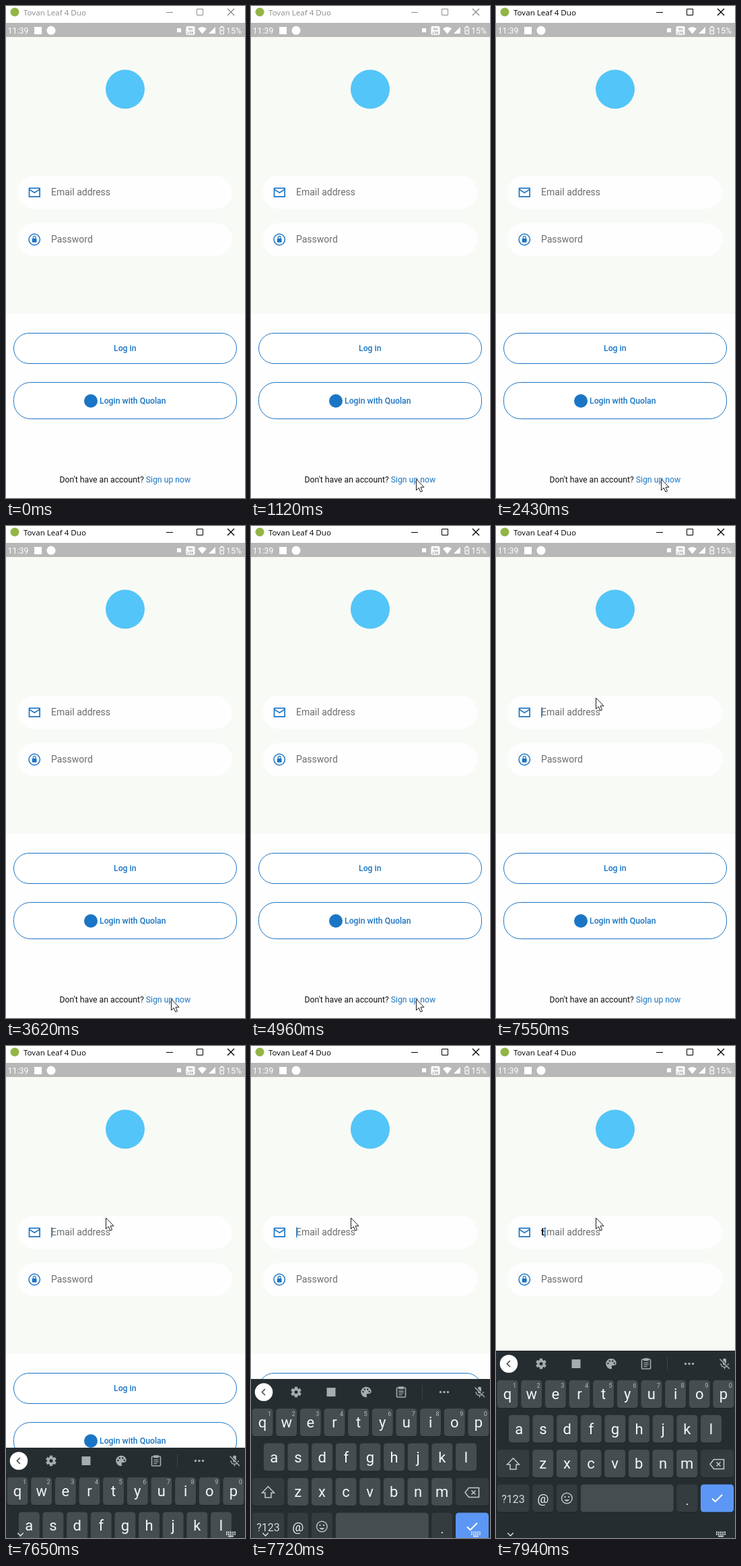
An HTML page with a canvas that plays this animation: 355x730 px, repeating every 8 s.

```html
<!DOCTYPE html>
<html lang="en">
<head>
<meta charset="utf-8">
<title>Login screen</title>
<style>
html, body { margin: 0; width: 100%; height: 100%; overflow: hidden; background: #fff; }
canvas { display: block; width: 355px; height: 730px; }
</style>
</head>
<body>
<canvas id="stage"></canvas>
<script>
const W = 355, H = 730, LOOP = 8000;
const BLUE = '#1a75c4', KEY = '#454d50', DARK_KEY = '#343c40', PANEL = '#252d30', ICON = '#a6adb1';
const canvas = document.getElementById('stage');
const ctx = canvas.getContext('2d');
const dpr = window.devicePixelRatio || 1;
canvas.width = W * dpr;
canvas.height = H * dpr;

const clamp = v => Math.max(0, Math.min(1, v));
const phase = (t, from, to) => clamp((t - from) / (to - from));
const easeOut = p => 1 - (1 - p) ** 3;
const easeInOut = p => p * p * (3 - 2 * p);
const mix = (a, b, p) => a + (b - a) * p;

function text(str, x, y, size, color, { weight = 400, align = 'left', family = 'Roboto' } = {}) {
  ctx.font = `${weight} ${size}px ${family}, sans-serif`;
  ctx.textAlign = align;
  ctx.fillStyle = color;
  ctx.fillText(str, x, y);
}

function rect(x, y, w, h, color) {
  ctx.fillStyle = color;
  ctx.fillRect(x, y, w, h);
}

function rounded(x, y, w, h, r, fill, stroke, line = 1) {
  ctx.beginPath();
  ctx.roundRect(x, y, w, h, r);
  if (fill) { ctx.fillStyle = fill; ctx.fill(); }
  if (stroke) { ctx.strokeStyle = stroke; ctx.lineWidth = line; ctx.stroke(); }
}

function circle(x, y, r, fill, stroke, line = 1) {
  ctx.beginPath();
  ctx.arc(x, y, r, 0, 7);
  if (fill) { ctx.fillStyle = fill; ctx.fill(); }
  if (stroke) { ctx.strokeStyle = stroke; ctx.lineWidth = line; ctx.stroke(); }
}

// Draws a path given relative to the point x, y.
function shape(d, x, y, fill, stroke, line = 1.5) {
  ctx.save();
  ctx.translate(x, y);
  const path = new Path2D(d);
  if (fill) { ctx.fillStyle = fill; ctx.fill(path); }
  if (stroke) { ctx.strokeStyle = stroke; ctx.lineWidth = line; ctx.stroke(path); }
  ctx.restore();
}

function titleBar(active) {
  const ink = active ? '#000' : '#8c8c8c';
  rect(0, 0, W, 25, '#fff');
  circle(13, 9, 6.5, '#93b545');
  text('Tovan Leaf 4 Duo', 26, 14, 11.6, ink, { family: 'Open Sans' });
  shape('M238 9.5h10M283.5 4.5h9v9h-9z', 0, 0, null, ink, 1);
  shape('M-5 -5L5 5M5 -5L-5 5', 334, 9, null, ink, 1.4);
}

function statusBar() {
  rect(0, 25, W, 21, '#b8b8b8');
  text('11:39', 2.5, 41, 12.4, '#fff');
  rect(42, 31, 11, 11, '#fff');
  circle(67, 36.3, 6.5, '#fff');
  rect(254, 33, 6, 6, '#fff');
  rounded(267.5, 30, 13, 13, 2, '#fff');
  text('Vo', 274, 36, 5.5, '#999', { weight: 700, align: 'center' });
  text('LTE', 274, 41.5, 5.5, '#999', { weight: 700, align: 'center' });
  shape('M0 5.5L-6.5 -2.5Q0 -7.5 6.5 -2.5z', 291.5, 36, '#fff');
  shape('M-5 5H5V-5z', 306, 36, '#fff');
  rounded(318, 31.5, 5.5, 10, 1, null, '#fff', 1.2);
  rect(319.5, 29.7, 2.5, 1.6, '#fff');
  shape('M1 -3L-1.5 .7H0L-.6 3.2L1.7 -.6H.3z', 320.7, 36.4, '#fff');
  text('15%', 327, 41, 12.4, '#fff');
}

function button(y, h, r) {
  rounded(11.5, y + .5, 331, h, r, '#fff', BLUE);
}

function loginScreen(t) {
  rect(0, 46, W, 411, '#f8faf6');
  rect(0, 457, W, 273, '#fefefe');
  circle(177, 123.5, 29, '#54c5f8');

  rounded(17, 252, 319, 49, 24.5, '#fefefe');
  rounded(17, 322, 319, 49, 24.5, '#fefefe');
  shape('M-7.8 -6.2H7.8V6.2H-7.8zM-7.8 -4.5L0 .4L7.8 -4.5', 42.3, 276.6, null, BLUE, 1.7);
  circle(42.2, 346.5, 8.2, null, BLUE, 1.5);
  rounded(38.8, 345, 6.8, 5.8, .8, BLUE);
  shape('M-2 0V-1.6a2 2 0 0 1 4 0V0', 42.2, 345, null, BLUE, 1.2);
  text('Email address', 67, 281, 14, '#6b6e6c');
  text('Password', 67, 351, 14, '#6b6e6c');

  const typed = t >= 7930;
  if (typed) text('t', 67, 281, 14, '#111', { weight: 500 });
  if (t >= 7400) rect(typed ? 72 : 67, 269, 1.5, 15, '#2f82c9');

  button(485, 45, 22.5);
  text('Log in', 160, 512, 12.25, BLUE, { weight: 500 });
  button(558, 54, 25);
  circle(126, 586, 10, BLUE);
  text('Login with Quolan', 139, 590, 12.25, BLUE, { weight: 500 });
  text("Don't have an account?", 79.5, 707, 12.25, '#111');
  text('Sign up now', 207.7, 707, 12.25, BLUE);
}

function key(x, y, w, color = KEY) {
  rounded(x, y + 1, w, 41, 4.5, '#1b2225');
  rounded(x, y, w, 41, 4.5, color);
}

function letters(row, x, y, digits) {
  [...row].forEach((ch, i) => {
    const cx = x + i * 35.65;
    key(cx - 15.5, y, 31);
    text(ch, cx, y + 28, 22, '#f4f6f6', { align: 'center' });
    if (digits) text((i + 1) % 10, cx + 10.5, y + 10.5, 9, '#b4babd', { align: 'center' });
  });
}

function gear(x, y) {
  ctx.save();
  ctx.translate(x, y);
  for (let i = 0; i < 6; i++) {
    rect(-2.2, -7.8, 4.4, 4, ICON);
    ctx.rotate(Math.PI / 3);
  }
  ctx.restore();
  circle(x, y, 4.2, null, ICON, 3.4);
}

function toolbar(y) {
  circle(19, y, 13.3, '#fff');
  shape('M2.2 -4.5L-2.3 0L2.2 4.5', 18.7, y, null, '#444', 1.6);
  gear(67, y);
  rect(112.5, y - 6.5, 13, 13, ICON);

  shape('M0 -7.8a7.8 7.8 0 0 0 0 15.6q1.8-.4 1-2.4q-1.2-2.6 1.2-3H4Q7.8 2 7.8 -1Q7 -7.4 0 -7.8z', 171, y, ICON);
  [[-4.6, -.6], [-2.2, -4], [2.2, -4], [4.8, -.8]].forEach(([dx, dy]) => circle(171 + dx, y + dy, 1.2, PANEL));

  rounded(216.5, y - 6.5, 13, 14, 1, null, ICON, 1.6);
  rect(219.3, y - 8.3, 7.4, 4, ICON);
  shape('M-3.6 -1.3H3.6M-3.6 1.4H3.6M-3.6 4.1H1.5', 223, y, null, ICON, 1.3);

  rect(254, y - 10, 1, 20, '#3b4448');
  [281.5, 287, 292.5].forEach(x => circle(x, y, 1.7, ICON));

  rounded(337, y - 8, 5, 10, 2.5, ICON);
  shape('M-5.5 -.5a5.5 5.5 0 0 0 11 0M0 5V8', 339.5, y, null, ICON, 1.4);
  shape('M-7 -7L7.5 7.5', 340.2, y - .8, null, PANEL, 1.5);
  shape('M-7 -7L7.5 7.5', 339.5, y, null, ICON, 1.5);
}

// The navigation icons stay put while the panel slides beneath them.
function navigation() {
  shape('M-4.2 -2L0 2.2L4.2 -2', 21.5, 724.5, null, '#e4e7e8', 1.4);
  for (let i = 0; i < 10; i++) rect(327 + (i % 5) * 3, i < 5 ? 720.5 : 723.5, 2, 2, '#e4e7e8');
  rect(330, 726.5, 8, 1.8, '#e4e7e8');
}

function keyboard(top) {
  rect(0, top, W, H - top, PANEL);
  toolbar(top + 19.5);
  letters('qwertyuiop', 17, top + 44, true);
  letters('asdfghjkl', 34.3, top + 95.5);

  const row3 = top + 147, row4 = top + 198.5;
  key(1.5, row3, 48, DARK_KEY);
  shape('M0 -8.5L9 1H4.5V8H-4.5V1H-9z', 25.5, row3 + 21, null, '#c3c9cb', 1.5);
  letters('zxcvbnm', 69.7, row3);
  key(304, row3, 49, DARK_KEY);
  shape('M-10 0L-4.5 -7H10.5V7H-4.5zM-.5 -3L5.5 3M5.5 -3L-.5 3', 328, row3 + 21.5, null, '#c3c9cb', 1.5);

  key(1.5, row4, 48, DARK_KEY);
  text('?123', 25.5, row4 + 27, 16, '#d5dadc', { align: 'center' });
  key(54.2, row4, 31, DARK_KEY);
  text('@', 69.7, row4 + 27.5, 19, '#f0f2f2', { align: 'center' });
  key(89.8, row4, 31, DARK_KEY);
  circle(105.3, row4 + 20.5, 7.8, null, '#b9c0c3', 1.5);
  circle(102.5, row4 + 18.5, 1.2, '#b9c0c3');
  circle(108.1, row4 + 18.5, 1.2, '#b9c0c3');
  shape('M-4 0Q0 5.5 4 0z', 105.3, row4 + 22.5, '#b9c0c3');
  key(125.7, row4, 138);
  key(268.3, row4, 31, DARK_KEY);
  text('.', 284, row4 + 30, 19, '#f0f2f2', { align: 'center' });
  key(304, row4, 49, '#5c97f5');
  shape('M-7.5 .5L-2.8 5L7.5 -5.3', 328.5, row4 + 20.5, null, '#fff', 2);
  navigation();
}

function pointer(t) {
  if (t < 210) return;
  const enter = easeOut(phase(t, 210, 610));
  const settle = easeInOut(phase(t, 900, 1120));
  const travel = easeInOut(phase(t, 5300, 6820));
  const x = mix(mix(280, 245.5, enter), 148.5, travel);
  const y = mix(mix(730, 698, enter) + 4 * settle, 255, travel);
  shape('M0 0V16.5L3.8 13L6.4 19L9 17.9L6.5 12H11.6z', x, y, '#fff', '#1c1c1c', 1);
}

function draw(now) {
  const t = now % LOOP;
  ctx.setTransform(dpr, 0, 0, dpr, 0, 0);
  loginScreen(t);
  titleBar(t >= 1920);
  statusBar();
  const rise = easeOut(phase(t, 7600, 7859));
  if (rise > 0) keyboard(mix(H, 452, rise));
  pointer(t);
  requestAnimationFrame(draw);
}
requestAnimationFrame(draw);
</script>
</body>
</html>
```
